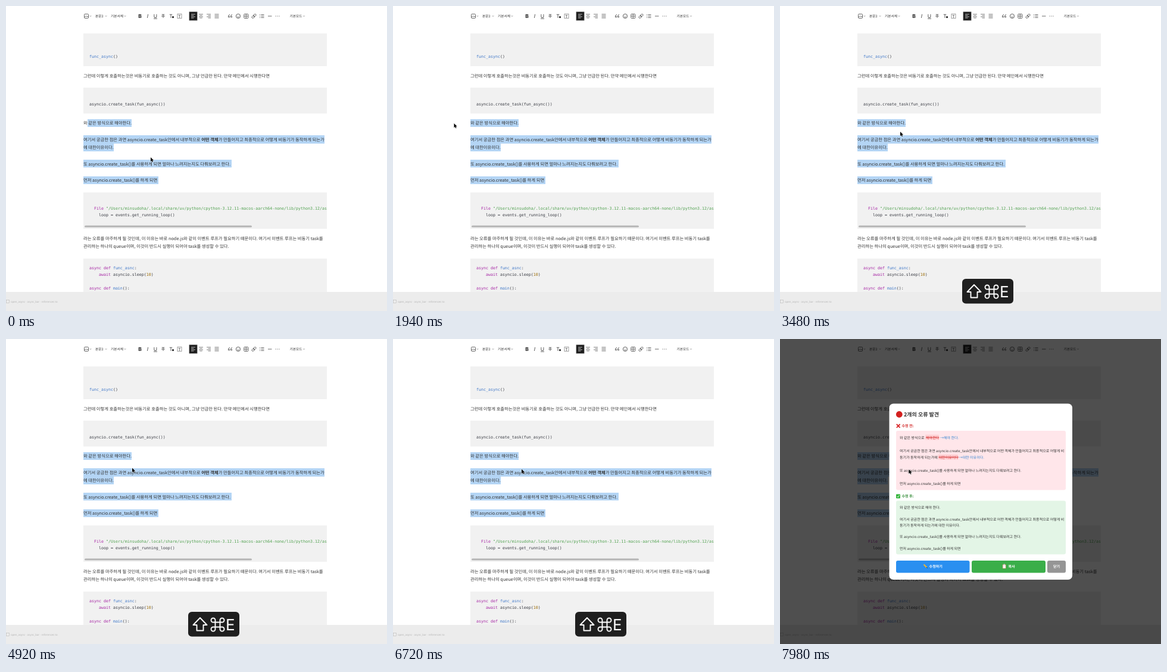
An HTML page for the animation above (8000 ms loop, 640 by 512 pixels).

```html
<!DOCTYPE html>
<html>
<head>
<meta charset="utf-8">
<style>
  html, body { margin: 0; width: 100%; height: 100%; overflow: hidden; background: #fff; }
  svg { display: block; width: 640px; height: 512px; }
  text { font: 7.32px "Noto Sans CJK KR", "Noto Sans CJK", "Noto Sans", sans-serif; fill: #333; text-rendering: geometricPrecision; }
  .mono { font: 6.64px "DejaVu Sans Mono", monospace; fill: #383a42; }
  .key { fill: #a626a4; }
  .fn { fill: #4078c8; }
  .str { fill: #50a14f; }
  .num { fill: #986801; }
  .menu { font-size: 5.7px; }
  .small { font-size: 6.05px; }
  .bold { font-weight: 700; }
  .cut { fill: #d32f2f; text-decoration: line-through; }
  .fix { fill: #3585d0; }
  .title { font-size: 9px; font-weight: 700; }
  .label { font-size: 6.05px; font-weight: 700; }
  .before { fill: #d32f2f; }
  .after { fill: #388e3c; }
  .button { font-size: 6.1px; font-weight: 700; fill: #fff; text-anchor: middle; }
  .status { font: 4.4px "Noto Sans", sans-serif; fill: #b4b4b4; }
  .icons { fill: none; stroke: #444; stroke-width: .8; }
  .icons text { stroke: none; text-anchor: middle; font: 8.5px Inter, sans-serif; }
</style>
</head>
<body>
<svg viewBox="0 0 640 512">
  <g id="page"></g>
  <g id="selection"></g>
  <g id="copy"></g>
  <path id="caret" d="M130.3 260v10" stroke="#444" stroke-width=".7"/>
  <g id="badge">
    <rect x="306" y="458" width="86" height="41.5" rx="6" fill="#1f1f1f"/>
    <g fill="none" stroke="#fff" stroke-width="1.9" stroke-linejoin="round">
      <path d="M326 468L337.5 480H331.5V489.5H320.5V480H314.5Z"/>
      <g id="command" transform="translate(355.5 479.5)"><path d="M-4-4H4V4H-4Z"/></g>
    </g>
    <text x="369" y="489" style="font:26px Inter,sans-serif;fill:#fff">E</text>
  </g>
  <g id="dialog"><rect width="640" height="512" fill="#000" opacity=".69"/></g>
  <path id="pointer" d="M0 0V7.2L1.7 5.7 2.8 8.2 4 7.7 2.9 5.3H5.2Z" fill="#000" stroke="#fff" stroke-width=".8" paint-order="stroke"/>
</svg>
<script>
const LOOP = 8000;
const $ = id => document.getElementById(id);
const add = (id, markup) => $(id).insertAdjacentHTML('beforeend', markup);
const rect = (x, y, w, h, fill, rx = 0) =>
  `<rect x="${x}" y="${y}" width="${w}" height="${h}" rx="${rx}" fill="${fill}"/>`;
const text = (x, y, body, cls = '') => `<text x="${x}" y="${y + 2.6}" class="${cls}">${body}</text>`;
const code = (x, y, body) => text(x, y - .3, body, 'mono');
const span = (cls, body) => `<tspan class="${cls}">${body}</tspan>`;
const chevron = x => `<path d="M${x - 1.2} 16.3l1.2 1.2 1.2-1.2" stroke-width=".6"/>`;

// Page: toolbar and code blocks
const blocks = [[46, 55], [137, 43.5], [313, 61], [424, 57]];
add('page', rect(0, 0, 640, 512, '#fff') +
  blocks.map(([y, h]) => rect(130, y, 409, h, '#f1f1f1')).join('') +
  rect(132, 368.5, 281, 3, '#b5b5b5', 1.5));

const alignIcon = (x, shift, color, short = 4.5) => [0, 1, 2, 3].map(i => {
  const w = i % 2 ? short : 7;
  return `<path d="M${x - 3.5 + (7 - w) * shift} ${13.8 + i * 2.1}h${w}" stroke="${color}"/>`;
}).join('');
const glyph = (x, body, style = '') => `<text x="${x}" y="20" style="${style}">${body}</text>`;

add('page', `<g class="icons">
  <rect x="131.5" y="13.5" width="7" height="7" rx="1"/><path d="M132 19l2.2-2.4 1.6 1.5 1-1 1.8 2"/>
  ${[142, 168, 200, 500.5].map(chevron).join('')}
  ${glyph(225, 'B', 'font-weight:800')}${glyph(238, 'I', 'font-style:italic;font-family:"Noto Serif",serif')}
  ${glyph(251, 'U')}<path d="M248 21.3h6"/>
  ${glyph(264, 'T')}<path d="M261 17h6"/>
  ${glyph(277, 'T')}<circle cx="280.5" cy="18.7" r="1.6" fill="#222" stroke="none"/>
  <rect x="288" y="13.3" width="7" height="7.4" stroke="#888"/>${glyph(291.5, 'T', 'font-size:6.6px')}
  ${rect(308, 10, 13, 14, '#1c1c1c')}
  ${alignIcon(314.5, 0, '#ddd')}${alignIcon(327.5, .5, '#666')}
  ${alignIcon(340.5, 1, '#666')}${alignIcon(354, 0, '#666', 7)}
  <path d="M376 14.2q-2.6 1-2.6 3.6M380 14.2q-2.6 1-2.6 3.6"/><circle cx="374.6" cy="18.2" r="1.1"/><circle cx="378.6" cy="18.2" r="1.1"/>
  <circle cx="390" cy="17" r="3.7"/><path d="M388 18q2 2.2 4 0M388.5 15.6v.8M391.5 15.6v.8"/>
  <rect x="399.8" y="13.5" width="7" height="7" rx=".8"/><path d="M403.3 13.5v7M399.8 17h7"/>
  <g transform="rotate(-45 416.5 17)"><rect x="412.2" y="15.4" width="5" height="3.2" rx="1.6"/><rect x="415.8" y="15.4" width="5" height="3.2" rx="1.6"/></g>
  <path d="M426 14.5h1M428.3 14.5h5.2M426 17h1M428.3 17h5.2M426 19.5h1M428.3 19.5h5.2M440 17h6.5"/>
  <path d="M452.5 17h1.2M455.4 17h1.2M458.3 17h1.2"/>
</g>` + text(150, 16.5, '본문2', 'menu') + text(176, 16.5, '기본서체', 'menu') + text(476.5, 16.5, '기본모드', 'menu'));

// Article text
const task = 'asyncio.create_task';
const path = '"/Users/minsudoha/.local/share/uv/python/cpython-3.12.11-macos-aarch64-none/lib/python3.12/asyncio/';
add('copy', `<clipPath id="clip"><rect x="130" y="313" width="408.5" height="61"/></clipPath>` +
  code(140, 85, span('fn', 'func_async') + '()') +
  text(130, 117, '그런데 이렇게 호출하는것은 비동기로 호출하는 것도 아니며, 그냥 언급만 된다. 만약 메인에서 시행한다면') +
  code(140, 164.5, `${task}(fun_async())`) +
  text(130, 196.5, '와 같은 방식으로 해야한다.') +
  text(130, 224, `여기서 궁금한 점은 과연 ${task}안에서 내부적으로 ${span('bold', '어떤 객체')}가 만들어지고 최종적으로 어떻게 비동기가 동작하게 되는가`) +
  text(130, 237.5, '에 대한이유이다.') +
  text(130, 265, `또 ${task}()를 사용하게 되면 얼마나 느려지는지도 다뤄보려고 한다.`) +
  text(130, 292.5, `먼저 ${task}()를 하게 되면`) +
  `<g clip-path="url(#clip)">${code(148, 339.5, span('key', 'File ') + span('str', path))}</g>` +
  code(156, 351, 'loop = events.get_running_loop()') +
  text(130, 390, '라는 오류를 마주하게 될 것인데, 이 이유는 바로 node.js와 같이 이벤트 루프가 필요하기 때문이다. 여기서 이벤트 루프는 비동기 task를') +
  text(130, 403.5, '관리하는 하나의 queue이며, 이것이 반드시 실행이 되어야 task를 생성할 수 있다.') +
  code(140, 439.5, span('key', 'async def ') + span('fn', 'func_asnc') + ':') +
  code(156, 451, span('key', 'await') + ' asyncio.sleep(' + span('num', '10') + ')') +
  code(140, 473.5, span('key', 'async def ') + span('fn', 'main') + '():') +
  rect(0, 480, 640, 32, '#ececec') +
  '<rect x=".5" y="493.5" width="5" height="5" fill="none" stroke="#bbb" stroke-width=".6"/>' +
  text(8, 495, 'open_async · async_bar · references to', 'status'));

add('command', [0, 90, 180, 270].map(a =>
  `<path transform="rotate(${a})" d="M-4-4H-7.5a3.5 3.5 0 1 1 3.5-3.5Z"/>`).join(''));

// Correction dialog
const button = (x, w, fill, label, shift = 0) =>
  rect(x, 372, w, 20.5, fill, 3) + text(x + w / 2 + shift, 381.8, label, 'button');
const question = `여기서 궁금한 점은 과연 ${task}안에서 내부적으로 어떤 객체가 만들어지고 최종적으로 어떻게 비`;
const tail = (a, b) =>
  text(201, a, `또 ${task}()를 사용하게 되면 얼마나 느려지는지도 다뤄보려고 한다.`, 'small') +
  text(201, b, `먼저 ${task}()를 하게 되면`, 'small');
add('dialog', rect(183.5, 108.5, 307.5, 295.5, '#fff', 7) +
  '<circle cx="200.3" cy="126.5" r="5.4" fill="#d3201f"/>' +
  text(208, 127.2, '2개의 오류 발견', 'title') +
  '<path d="M195.8 143l5.8 5.8M201.6 143l-5.8 5.8" stroke="#d9292b" stroke-width="1.8"/>' +
  text(204.5, 145.7, '수정 전:', 'label before') +
  rect(195, 154, 285, 99.5, '#ffe6ea', 3) +
  text(201, 165, '와 같은 방식으로', 'small') +
  rect(244, 160.5, 23, 9, '#ffd4d8', 1) +
  text(245, 165, '해야한다', 'small cut') + text(269, 165, '→해야 한다.', 'small fix') +
  text(201, 187, question, 'small') + text(201, 198, '동기가 동작하게 되는가에', 'small') +
  rect(265.5, 193.5, 33.5, 9, '#ffd4d8', 1) +
  text(266.5, 198, '대한이유이다', 'small cut') + text(300.5, 198, '→대한 이유이다.', 'small fix') +
  tail(220, 242) +
  rect(195, 260.5, 7, 7, '#35b53c', 1) + '<path d="M196.6 264l1.5 1.6 2.6-3.4" fill="none" stroke="#fff"/>' +
  text(204.5, 263.7, '수정 후:', 'label after') +
  rect(195, 271.5, 285, 90, '#e3f5e6', 3) +
  text(201, 282, '와 같은 방식으로 해야 한다.', 'small') +
  text(201, 302, question, 'small') + text(201, 312, '동기가 동작하게 되는가에 대한 이유이다.', 'small') +
  tail(331, 351) +
  button(195, 123.5, '#2a8ff0', '수정하기', 5) + button(322, 124, '#3aae49', '복사', 5) + button(449, 31, '#959595', '닫기') +
  '<path d="M241.5 378.5l5 5" stroke="#f1b52b" stroke-width="2"/><path d="M246 383l1.6 1.6" stroke="#403010"/>' +
  rect(373.7, 378.2, 6, 7.2, '#b98a55', .8) + rect(374.4, 379.2, 4.6, 5.6, '#f4f4f4') + rect(375.5, 377.6, 2.4, 1.6, '#ccc'));

// Motion: time, x, y of the pointer tip
const track = [
  [0, 243, 254], [650, 262, 294.5], [1150, 262, 294.5], [1500, 185, 248], [1800, 108, 199],
  [1940, 102.5, 197], [2450, 102.5, 197], [3150, 197, 209], [3480, 202, 211],
  [4150, 210, 215.5], [4920, 212, 216.5], [6720, 216, 218.5], [8000, 216.5, 219]
];
const DRAG_START = 1150, DRAG_END = 1940, RELEASE = 850, KEYS = 3250, RESULT = 7000;
const lines = [[190, 203, 211], [217, 231, 535], [231, 244, 181], [258, 271, 379], [286, 299, 256]];

add('selection', lines.map(([top, bottom]) => rect(130, top, 0, bottom - top, '#b4d5f5')).join(''));
const bars = [...$('selection').children];

function pointerAt(t) {
  const i = Math.max(1, track.findIndex(p => p[0] >= t));
  const [a, b] = [track[i - 1], track[i]];
  const k = (t - a[0]) / (b[0] - a[0]);
  const s = k * k * (3 - 2 * k);
  return [a[1] + (b[1] - a[1]) * s, a[2] + (b[2] - a[2]) * s];
}

function select(x, y) {
  const first = lines.findIndex(l => l[1] + 5 > y);
  bars.forEach((bar, i) => {
    const right = lines[i][2];
    const left = i < first ? right : i > first ? 130 : Math.min(right, Math.max(130, x));
    bar.setAttribute('x', left);
    bar.setAttribute('width', right - left);
  });
}

const show = (id, on) => { $(id).style.display = on ? '' : 'none'; };

function draw(t) {
  const [x, y] = pointerAt(t);
  $('pointer').setAttribute('transform', `translate(${x} ${y})`);
  if (t < RELEASE) select(137, 196);
  else select(...pointerAt(Math.min(Math.max(t, DRAG_START), DRAG_END)));
  show('caret', t >= RELEASE && t < DRAG_START);
  show('badge', t >= KEYS && t < RESULT);
  show('dialog', t >= RESULT);
}

const start = performance.now();
function tick() {
  draw((performance.now() - start) % LOOP);
  requestAnimationFrame(tick);
}
tick();
</script>
</body>
</html>
```
